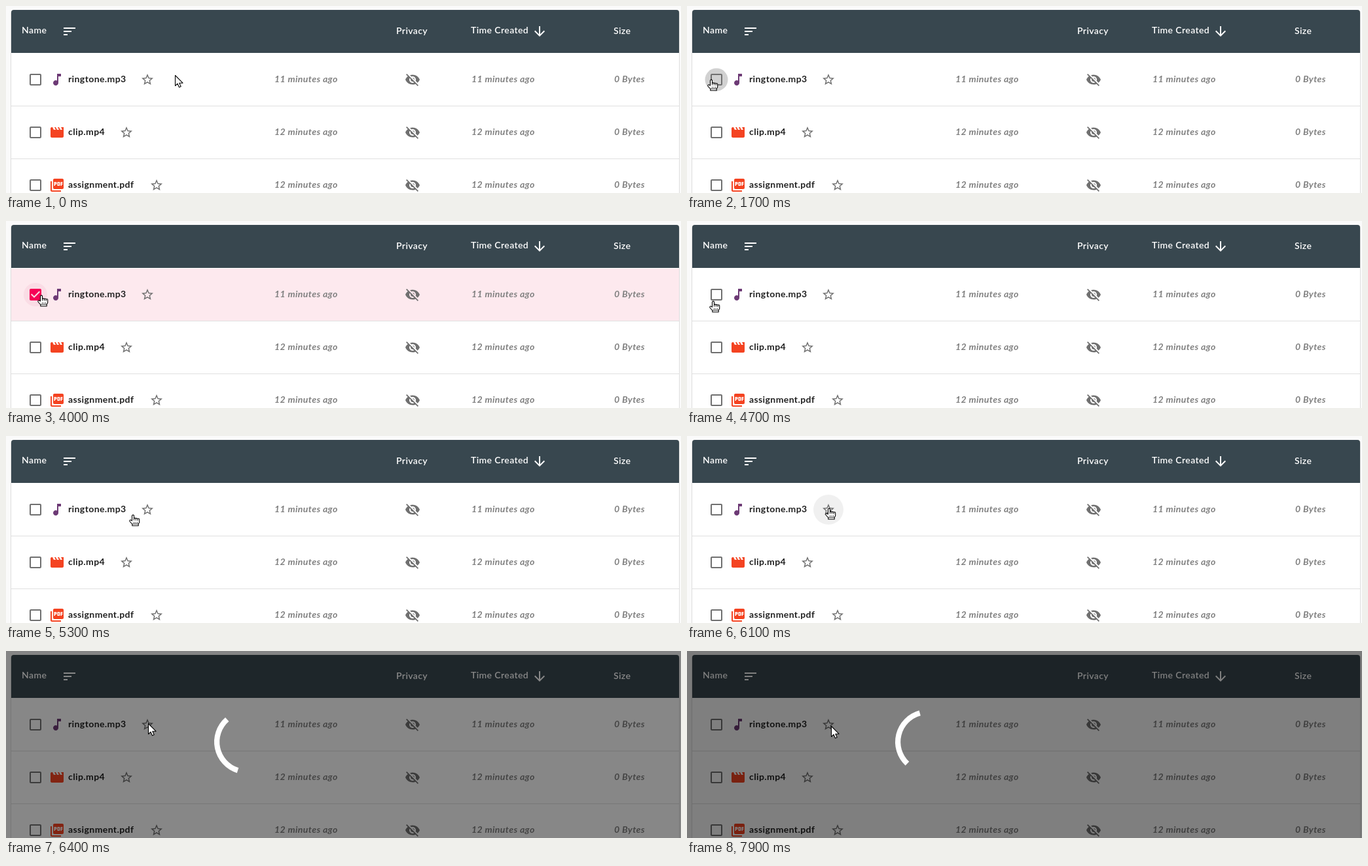
Write an HTML page that moves like this. It is 1031 px wide and 287 px high and loops after 8 s.

```html
<!DOCTYPE html>
<html lang="en">
<head>
<meta charset="utf-8">
<title>File list</title>
<style>
  html, body { margin: 0; width: 100%; height: 100%; overflow: hidden; background: #fafafa; }
  svg { display: block; width: 1031px; height: 287px; }
  text { font: 700 14px Lato, "Open Sans", sans-serif; letter-spacing: .4px; }
  .head text { font-weight: 600; fill: #fff; }
  .file { fill: #212121; }
  .meta { font-style: italic; fill: #808080; }
</style>
</head>
<body>
<svg viewBox="0 0 1031 287">
  <defs>
    <path id="box" d="M19 5v14H5V5h14m0-2H5c-1.1 0-2 .9-2 2v14c0 1.1.9 2 2 2h14c1.1 0 2-.9 2-2V5c0-1.1-.9-2-2-2z"/>
    <path id="checked" d="M19 3H5c-1.1 0-2 .9-2 2v14c0 1.1.9 2 2 2h14c1.1 0 2-.9 2-2V5c0-1.1-.9-2-2-2zm-9 14l-5-5 1.41-1.41L10 14.17l7.59-7.59L19 8l-9 9z"/>
    <path id="note" d="M12 3v10.55c-.59-.34-1.27-.55-2-.55-2.21 0-4 1.79-4 4s1.79 4 4 4 4-1.79 4-4V7h4V3h-6z"/>
    <path id="movie" d="M18 4l2 4h-3l-2-4h-2l2 4h-3l-2-4H8l2 4H7L5 4H4c-1.1 0-2 .9-2 2v12c0 1.1.9 2 2 2h16c1.1 0 2-.9 2-2V4h-4z"/>
    <path id="pdf" d="M20 2H8c-1.1 0-2 .9-2 2v12c0 1.1.9 2 2 2h12c1.1 0 2-.9 2-2V4c0-1.1-.9-2-2-2zm-8.5 7.5c0 .83-.67 1.5-1.5 1.5H9v2H7.5V7H10c.83 0 1.5.67 1.5 1.5v1zm5 2c0 .83-.67 1.5-1.5 1.5h-2.5V7H15c.83 0 1.5.67 1.5 1.5v3zm4-3H19v1h1.5V11H19v2h-1.5V7h3v1.5zM9 9.5h1v-1H9v1zM4 6H2v14c0 1.1.9 2 2 2h14v-2H4V6zm10 5.5h1v-3h-1v3z"/>
    <path id="star" d="M22 9.24l-7.19-.62L12 2 9.19 8.63 2 9.24l5.46 4.73L5.82 21 12 17.27 18.18 21l-1.63-7.03L22 9.24zM12 15.4l-3.76 2.27 1-4.28-3.32-2.88 4.38-.38L12 6.1l1.71 4.04 4.38.38-3.32 2.88 1 4.28L12 15.4z"/>
    <path id="hidden" d="M12 7c2.76 0 5 2.24 5 5 0 .65-.13 1.26-.36 1.83l2.92 2.92c1.51-1.26 2.7-2.89 3.43-4.75-1.73-4.39-6-7.5-11-7.5-1.4 0-2.74.25-3.98.7l2.16 2.16C10.74 7.13 11.35 7 12 7zM2 4.27l2.28 2.28.46.46C3.08 8.3 1.78 10.02 1 12c1.73 4.39 6 7.5 11 7.5 1.55 0 3.03-.3 4.38-.84l.42.42L19.73 22 21 20.73 3.27 3 2 4.27zM7.53 9.8l1.55 1.55c-.05.21-.08.43-.08.65 0 1.66 1.34 3 3 3 .22 0 .44-.03.65-.08l1.55 1.55c-.67.33-1.41.53-2.2.53-2.76 0-5-2.24-5-5 0-.79.2-1.53.53-2.2zm4.31-.78l3.15 3.15.02-.16c0-1.66-1.34-3-3-3l-.17.01z"/>
  </defs>

  <rect width="1031" height="287" fill="#fafafa"/>
  <rect x="7.5" y="6.5" width="1021" height="300" rx="4" fill="#fff" stroke="#dedede"/>
  <g class="head">
    <path d="M8 72V10a4 4 0 0 1 4-4H1024a4 4 0 0 1 4 4V72Z" fill="#38474f"/>
    <text x="24" y="42">Name</text>
    <text x="596" y="43">Privacy</text>
    <text x="710" y="42">Time Created</text>
    <text x="928" y="43">Size</text>
    <path transform="translate(85 27)" fill="#fff" d="M3 18h6v-2H3v2zM3 6v2h18V6H3zm0 7h12v-2H3v2z"/>
    <path transform="translate(803 27)" fill="#fff" d="M20 12l-1.41-1.41L13 16.17V4h-2v12.17l-5.58-5.59L4 12l8 8 8-8z"/>
  </g>
  <rect id="selected" x="8" y="73" width="1020" height="80" fill="#fde9ee"/>
  <circle id="ripple"/>
  <g id="rows"></g>
  <use id="tick" href="#checked" x="33" y="101" fill="#f50057"/>
  <rect id="shade" width="1031" height="287"/>
  <path id="spinner" fill="none" stroke="#fff" stroke-width="8.2"/>
  <g id="cursor" stroke="#000" stroke-width="1.1" stroke-linejoin="round" fill="#fff">
    <path id="arrow" d="M.5 .5V16.5L4 13.2L6.5 18.8L9.2 17.6L6.8 12.2H12Z"/>
    <g id="hand">
      <path d="M-1.5 9V1.6a1.5 1.5 0 0 1 3 0V6.2a1.4 1.4 0 0 1 2.8.2a1.4 1.4 0 0 1 2.8.4a1.3 1.3 0 0 1 2.6.6V11.5L8.2 14V16.8H-1.2V14.5L-5 10a1.4 1.4 0 0 1 2.1-1.8Z"/>
      <path d="M1.5 6V8.5M4.3 6.5V8.7M7.1 7V9M-1 14H8M1.5 11V12.5M4 11V12.5M6.5 11V12.5" fill="none" stroke-width=".9"/>
    </g>
  </g>
</svg>
<script>
const $ = id => document.getElementById(id);
const set = (id, attrs) => { for (const k in attrs) $(id).setAttribute(k, attrs[k]); };
const show = (id, on) => set(id, { visibility: on ? 'visible' : 'hidden' });

const files = [
  ['ringtone.mp3', 'note', '#6d3a75', 11, 216],
  ['clip.mp4', 'movie', '#f44321', 12, 184],
  ['assignment.pdf', 'pdf', '#f44321', 12, 230]
];
const icon = (id, x, y, fill = '#707070') => `<use href="#${id}" x="${x}" y="${y}" fill="${fill}"/>`;

$('rows').innerHTML = files.map(([name, type, color, age, starX], i) => {
  const ago = x => `<text class="meta" x="${x}" y="117">${age} minutes ago</text>`;
  return `<g transform="translate(0 ${i * 81})">
    <g${i ? '' : ' id="empty"'}>${icon('box', 33, 101)}</g>
    ${icon(type, 66, 101, color)}
    <text class="file" x="95" y="117">${name}</text>
    <g transform="translate(${starX} 113) scale(.9)">${icon('star', -12, -12)}</g>
    ${ago(410)}${icon('hidden', 609, 101)}${ago(711)}
    <text class="meta" x="929" y="117">0 Bytes</text>
    <path d="M8 153.5H1028" stroke="#e0e0e0"/>
  </g>`;
}).join('');

// Pointer tip: time, x, y
const track = [
  [300, 258, 106], [500, 215, 110], [800, 80, 119], [1000, 40, 113], [1100, 40, 113],
  [1200, 37, 113], [2100, 37, 113], [2400, 73, 119], [2500, 73, 119], [2700, 89, 125],
  [2900, 89, 125], [3000, 94, 136], [3100, 94, 136], [3500, 54, 114], [4300, 54, 114],
  [4800, 37, 125], [5300, 194, 121], [5700, 217, 111], [6400, 217, 111], [7000, 220, 115]
];
// Press ripples: start, full, gone, x, radius, colour, opacity
const ripples = [
  [1400, 1700, 1900, 45, 17.5, '#000', .18],
  [3400, 3700, 4300, 45, 18, '#c2185b', .12],
  [5800, 6000, 6200, 216, 23, '#000', .12]
];

function pointer(t) {
  const i = track.findIndex(p => p[0] > t);
  if (i < 0) return track[track.length - 1].slice(1);
  if (!i) return track[0].slice(1);
  const [a, b] = [track[i - 1], track[i]];
  const k = (t - a[0]) / (b[0] - a[0]);
  return [a[1] + (b[1] - a[1]) * k, a[2] + (b[2] - a[2]) * k];
}

function arc(from, sweep) {
  const at = deg => {
    const a = deg * Math.PI / 180;
    return `${368 + 45.9 * Math.cos(a)} ${139.5 + 45.9 * Math.sin(a)}`;
  };
  return `M${at(from)}A45.9 45.9 0 0 1 ${at(from + sweep)}`;
}

function draw(t) {
  const on = t >= 2600 && t < 4400;
  show('selected', on);
  show('tick', on);
  show('empty', !on);

  const r = ripples.find(p => t >= p[0] && t < p[2]);
  show('ripple', r);
  if (r) {
    const [start, full, gone, cx, radius, fill, alpha] = r;
    const grow = Math.min(1, (t - start + 100) / (full - start + 100));
    const fade = t > full ? (gone - t) / (gone - full) : 1;
    set('ripple', { cx, cy: 113, r: radius * grow, fill, opacity: alpha * fade });
  }

  const loading = t >= 6300;
  set('shade', { opacity: !loading ? 0 : t < 6400 ? .19 : t < 6500 ? .47 : .5 });
  show('spinner', loading);
  if (loading) set('spinner', { d: arc(82 + (t - 6300) * 360 / 1400, t < 6400 ? 90 : 121) });

  const [x, y] = pointer(t);
  const hand = t >= 600 && !loading;
  set('cursor', { transform: `translate(${Math.round(x)} ${Math.round(y)})` });
  show('hand', hand);
  show('arrow', !hand);
}

const begin = performance.now();
function tick() {
  const t = (performance.now() - begin) % 8000;
  draw(Math.floor(t / 100) * 100);
  requestAnimationFrame(tick);
}
tick();
</script>
</body>
</html>
```
